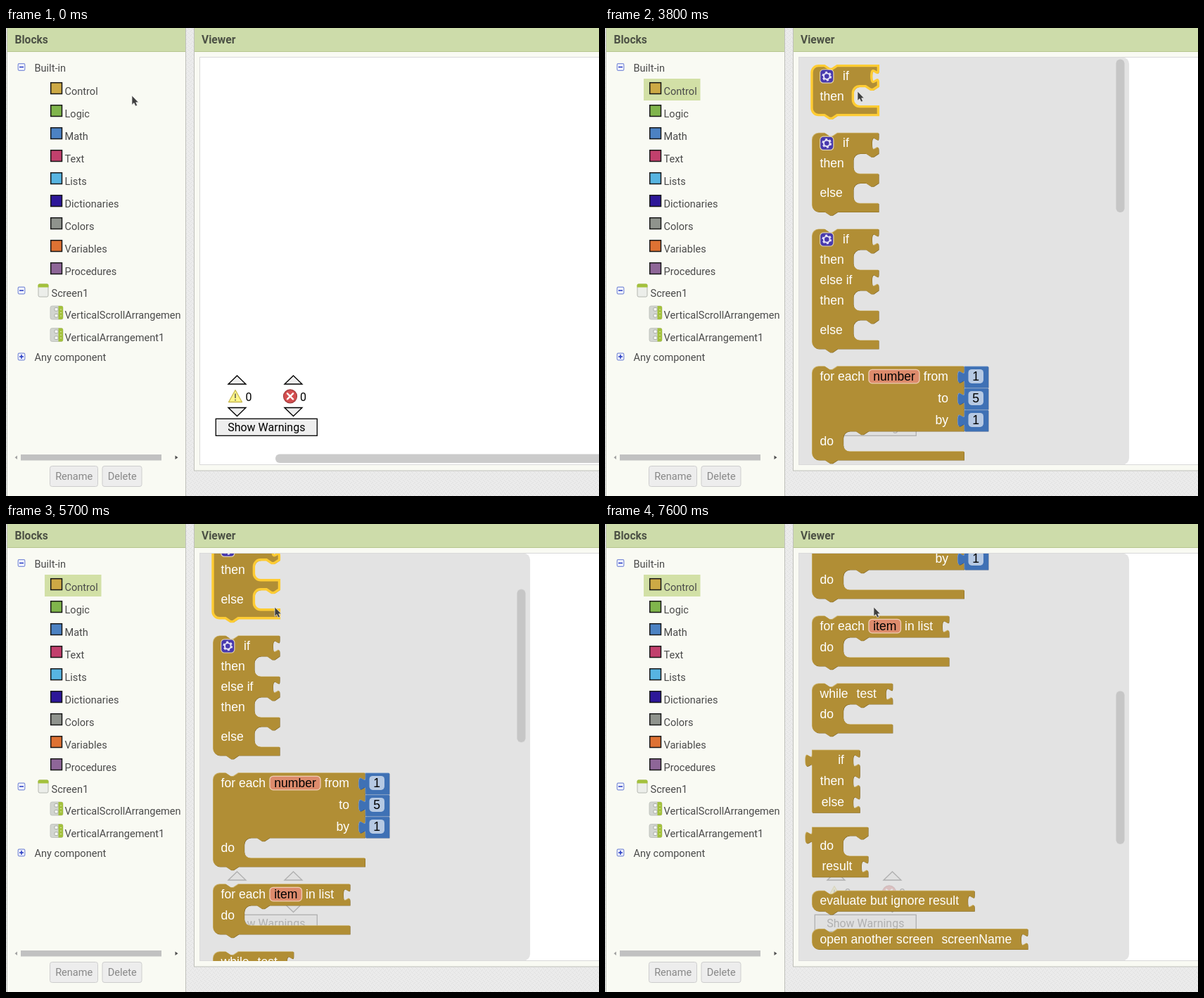
Animation, 843 px wide and 665 px high, one loop 8000 ms. Source, as an HTML page:

```html
<!DOCTYPE html>
<html lang="en">
<head>
<meta charset="utf-8">
<title>Blocks editor</title>
<style>
html, body { margin: 0; width: 100%; height: 100%; overflow: hidden; background: #e9e9e9; }
svg { display: block; }
.ui { font: 14.55px Roboto, sans-serif; fill: #4a4a4a; }
.head { font: bold 15.6px Roboto, sans-serif; fill: #4c5145; }
.warn { font: 16px Roboto, sans-serif; fill: #000; }
.block { font: 17.6px "Liberation Sans", Arial, sans-serif; fill: #fff; }
.block .dark { fill: #000; }
.sel { fill: none; stroke: #fc3; stroke-width: 3.4; }

/* every change is a hard cut */
.scroll, .thumb, .row, .flyout, .hbar, .cursor, .cursor > *, .sel, .lit {
  animation: 8s step-end infinite;
}
.sel, .lit { opacity: 0; }
.scroll { animation-name: scroll; }
.thumb { animation-name: thumb; }
.row { animation-name: row; }
.flyout { animation-name: flyout; }
.hbar { animation-name: hbar; }
.cursor { animation-name: move; }
.arrow { animation-name: arrow; }
.hand { animation-name: hand; }
.grab { animation-name: grab; }
.beam { animation-name: beam; }
.sel.s0 { animation-name: sel0; }
.sel.s1 { animation-name: sel1; }
.sel.s2 { animation-name: sel2; }
.lit { animation-name: beam; }

@keyframes scroll {
  0% { transform: translateY(0); }
  71.25% { transform: translateY(-127px); }
  77.5% { transform: translateY(-254px); }
  86.25% { transform: translateY(-381px); }
  95%, 100% { transform: translateY(-508px); }
}
@keyframes thumb {
  0% { transform: translateY(0); }
  71.25% { transform: translateY(48.2px); }
  77.5% { transform: translateY(96.4px); }
  86.25% { transform: translateY(144.6px); }
  95%, 100% { transform: translateY(192.8px); }
}
@keyframes row { 0% { opacity: 0; } 8.75%, 100% { opacity: 1; } }
@keyframes flyout { 0% { opacity: 0; } 47.5%, 100% { opacity: 1; } }
@keyframes hbar { 0% { opacity: 1; } 47.5%, 100% { opacity: 0; } }
@keyframes move {
  0% { transform: translate(179px, 96px); }
  1.25% { transform: translate(168px, 96px); }
  8.75% { transform: translate(125px, 91px); }
  10% { transform: translate(112px, 89.5px); }
  47.5% { transform: translate(359px, 90px); }
  52.5% { transform: translate(405px, 104px); }
  56.25% { transform: translate(417px, 108px); }
  57.5% { transform: translate(426px, 112px); }
  61.25% { transform: translate(389px, 106px); }
  63.75% { transform: translate(384.5px, 118px); }
  66.25% { transform: translate(383.8px, 117.8px); }
  71.25% { transform: translate(382px, 118px); }
  77.5% { transform: translate(383.8px, 117.8px); }
  86.25% { transform: translate(383px, 118px); }
  95%, 100% { transform: translate(382px, 118px); }
}
@keyframes arrow {
  0%, 47.5%, 71.25%, 95%, 100% { opacity: 1; }
  8.75%, 63.75%, 77.5% { opacity: 0; }
}
@keyframes hand { 0%, 47.5%, 100% { opacity: 0; } 8.75% { opacity: 1; } }
@keyframes grab { 0%, 71.25%, 86.25%, 100% { opacity: 0; } 63.75%, 77.5% { opacity: 1; } }
@keyframes beam { 0%, 95%, 100% { opacity: 0; } 86.25% { opacity: 1; } }
@keyframes sel0 { 0%, 56.25%, 71.25%, 100% { opacity: 0; } 47.5%, 63.75% { opacity: 1; } }
@keyframes sel1 { 0%, 77.5%, 100% { opacity: 0; } 71.25% { opacity: 1; } }
@keyframes sel2 { 0%, 86.25%, 100% { opacity: 0; } 77.5% { opacity: 1; } }
</style>
</head>
<body>
<svg width="843" height="665" viewBox="0 0 843 665">
  <defs>
    <pattern id="weave" width="6" height="6" patternUnits="userSpaceOnUse">
      <rect width="6" height="6" fill="#ebebeb"/>
      <path d="M0 0L3 3M3 6L6 3" stroke="#dfdfdf"/>
    </pattern>
    <clipPath id="view"><rect x="275" y="42" width="470" height="579"/></clipPath>
    <g id="toggle">
      <rect x="-4.8" y="-4.8" width="9.6" height="9.6" rx="1.5" fill="#f4f6ff" stroke="#7f8fd8" stroke-width="1.2"/>
      <path d="M-3 0H3" stroke="#2438c0" stroke-width="1.5"/>
    </g>
    <g id="vertical">
      <rect width="18" height="19" rx="2.5" fill="#d2d5d0" stroke="#b9bcb6" stroke-width=".8"/>
      <path d="M11.5 0H16a2 2 0 0 1 2 2V17a2 2 0 0 1-2 2H11.5Z" fill="#a3c13c"/>
      <g fill="#f6f7f4" stroke="#9da19a" stroke-width=".8">
        <rect x="6" y="2.5" width="5" height="4.5" rx="1"/>
        <rect x="6" y="11.5" width="5" height="4.5" rx="1"/>
      </g>
      <path d="M14 5h2M14 9.5h2M14 14h2" stroke="#dbe8ab"/>
    </g>
    <path id="up" d="M-12.5 12L0 0L12.5 12Z" fill="#eee" stroke="#000" stroke-width="1.3"/>
    <g id="gear">
      <g opacity=".6">
        <rect x="-9.6" y="-9.6" width="19.2" height="19.2" rx="4.8" fill="#00f" stroke="#fff" stroke-width="1.2"/>
      </g>
      <g fill="none" stroke="#e6e3f6">
        <circle r="4.3" stroke-width="2"/>
        <circle r="5.9" stroke-width="2" stroke-dasharray="3.09"/>
      </g>
    </g>
  </defs>

  <rect width="843" height="665" fill="url(#weave)"/>

  <!-- palette panel -->
  <rect x="1.5" y="-1" width="254" height="668" fill="#f9faf3" stroke="#bfc0ba"/>
  <rect x="2" width="253" height="33" fill="#cddcaa"/>
  <path d="M2 33.5H255" stroke="#b6c68f"/>
  <text class="head" x="12.5" y="21.5">Blocks</text>
  <rect class="row" x="55" y="72" width="80.5" height="31" fill="#d2e0a6"/>
  <g class="ui" id="tree">
    <text x="40.5" y="61.5">Built-in</text>
    <text x="64.5" y="382.4">Screen1</text>
    <text x="83.5" y="413.4">VerticalScrollArrangemen</text>
    <text x="83.5" y="445.4">VerticalArrangement1</text>
    <text x="40.5" y="473.4">Any component</text>
  </g>
  <use href="#toggle" x="22" y="55.5"/>
  <use href="#toggle" x="22" y="373"/>
  <use href="#toggle" x="22" y="467"/>
  <path d="M22 464V470" stroke="#2438c0" stroke-width="1.5"/>
  <rect x="46" y="364" width="14" height="18" rx="2" fill="#eceeea" stroke="#b4b7b0"/>
  <path d="M45.5 368.5V365.5a2 2 0 0 1 2-2H58.5a2 2 0 0 1 2 2V368.5Z" fill="#a3c13c"/>
  <use href="#vertical" x="63" y="395"/>
  <use href="#vertical" x="63" y="426.5"/>
  <rect x="21" y="606" width="200" height="8.5" fill="#c1c1c1"/>
  <path d="M16 607.5V613L12.5 610.2Z" fill="#a3a3a3"/>
  <path d="M240.5 607.5V613L244.5 610.2Z" fill="#505050"/>
  <g fill="#ededed" stroke="#cdcdcd">
    <rect x="62.5" y="622.5" width="68" height="29" rx="3"/>
    <rect x="137" y="622.5" width="56" height="29" rx="3"/>
  </g>
  <g class="ui" text-anchor="middle" style="fill:#888">
    <text x="96.7" y="642">Rename</text>
    <text x="165.2" y="642">Delete</text>
  </g>

  <!-- viewer panel -->
  <rect x="267.5" y="-1" width="580" height="630" fill="#f9faf3" stroke="#bfc0ba"/>
  <rect x="268" width="575" height="33" fill="#cddcaa"/>
  <path d="M268 33.5H843" stroke="#b6c68f"/>
  <text class="head" x="278" y="21.5">Viewer</text>
  <rect x="275.5" y="41.5" width="580" height="579" fill="#fff" stroke="#d9d9d9"/>
  <rect class="hbar" x="383" y="605.5" width="480" height="12.5" rx="6" fill="#cbcbcb"/>
  <use href="#up" x="328.5" y="494"/>
  <use href="#up" x="408.5" y="494"/>
  <use href="#up" transform="translate(328.5 551.5) scale(1 -1)"/>
  <use href="#up" transform="translate(408.5 551.5) scale(1 -1)"/>
  <path d="M326 514.5L335.5 531.5H316.5Z" fill="#fdf68c" stroke="#c9b94e" stroke-width="1.3" stroke-linejoin="round"/>
  <path d="M326 519.5V526M326 527.8V529.6" stroke="#6a6a5a" stroke-width="1.7"/>
  <circle cx="404" cy="523.3" r="9.5" fill="#d44f50" stroke="#a33c3e" stroke-width="1.2"/>
  <path d="M400 519.3l8 8m0-8l-8 8" stroke="#fff" stroke-width="2.4" stroke-linecap="round"/>
  <rect x="298.3" y="555.3" width="144" height="24" fill="#eee" stroke="#000" stroke-width="1.3"/>
  <g class="warn">
    <text x="340.5" y="529.8">0</text>
    <text x="418" y="529.8">0</text>
    <text x="370.3" y="573" text-anchor="middle">Show Warnings</text>
  </g>

  <g class="flyout">
    <path d="M275 41.5H735.5a9.6 9.6 0 0 1 9.6 9.6V611a9.6 9.6 0 0 1-9.6 9.6H275Z" fill="#ddd" fill-opacity=".8"/>
    <g clip-path="url(#view)"><g class="scroll block" id="blocks"></g></g>
    <rect class="thumb" x="726.5" y="44.5" width="12" height="217.5" rx="5.8" fill="#c6c6c6"/>
  </g>

  <g class="cursor">
    <path class="arrow" d="M0 0V13.2L3 10.5L5 15L7.6 14L5.7 9.7H9.4Z" fill="#3f3f3f" stroke="#eee" stroke-width=".7"/>
    <path class="hand" d="M-1.5 1.2q1.4-1.5 2.7 0L2 5.5l1.6-.7 1.4 1 1.7-.4 1 1 1.3.2q1 4-.9 9H1.2Q-1.5 12.5-4 9.3q.8-1.9 3.3-.2Z" fill="#444" stroke="#ddd" stroke-width=".7"/>
    <path class="grab" d="M-2.5 6.2Q-3.5 3.5-6.2.3q.3-2 2.6-.5L-5-4q.8-1.7 2.2-.2L-1.8-1.8-2-5.2q1.2-1.6 2.3 0L.8-2 1.6-5q1.4-1.2 2.2.3L3.4-1.5 4.8-3.5q1.8-.5 1.7 1.2Q5.9 3 4.6 6.2Z" fill="#fff" stroke="#111" stroke-width="1.1" stroke-linejoin="round"/>
    <g class="beam" fill="none">
      <path d="M-2.5-6.5Q0-6.5 0-4.5V4.5Q0 6.5-2.5 6.5M2.5-6.5Q0-6.5 0-4.5V4.5Q0 6.5 2.5 6.5M-1.5 2.5H1.5" stroke="#fff" stroke-width="2.2"/>
      <path d="M-2.5-6.5Q0-6.5 0-4.5V4.5Q0 6.5-2.5 6.5M2.5-6.5Q0-6.5 0-4.5V4.5Q0 6.5 2.5 6.5M-1.5 2.5H1.5" stroke="#444"/>
    </g>
  </g>
</svg>
<script>
const LEFT = 294;
const GOLD = ['#b18e35', '#cdb36a', '#836825'];
const BLUE = ['#3f71b5', '#7d9fd0', '#2c5189'];

const label = (x, y, s, anchor = 'start', cls = '') =>
  `<text x="${x}" y="${y}" text-anchor="${anchor}" class="${cls}">${s}</text>`;

const palette = [
  ['Control', '#cda945'], ['Logic', '#80b54c'], ['Math', '#4c82c3'],
  ['Text', '#c2406d'], ['Lists', '#57b4e1'], ['Dictionaries', '#2d1799'],
  ['Colors', '#8f938d'], ['Variables', '#de7233'], ['Procedures', '#8e6698']
];
document.getElementById('tree').innerHTML += palette.map(([name, color], i) =>
  `<rect x="63.7" y="${77.7 + 32 * i}" width="15.8" height="15.8" fill="${color}" stroke="#161616" stroke-width="1.5"/>` +
  label(83.5, 95 + 32 * i, name)).join('');

// Row kinds: v = value socket, s = statement mouth, b = plain bar.
function outline({ x = LEFT, y, right, rows, edge, out, next = true }) {
  const notch = 'l-7.2 4.8h-3.6l-7.2-4.8';
  const draw = {
    v: h => `v6c0 12-9.6-9.6-9.6 9s9.6-3 9.6 9v${h - 24}`,
    s: h => `H${edge + 36}${notch}h-8.4a9.6 9.6 0 0 0-9.6 9.6v${h - 19.2}a9.6 9.6 0 0 0 9.6 9.6H${right}`,
    b: h => `v${h}`
  };
  const start = out ? `M${x} ${y}`
    : `M${x} ${y + 9.6}a9.6 9.6 0 0 1 9.6-9.6h8.4l7.2 4.8h3.6l7.2-4.8`;
  const end = out ? `H${x}V${y + 24}c0-12-9.6 9.6-9.6-9s9.6 3 9.6-9z`
    : `${next ? `H${x + 36}${notch}` : ''}H${x + 9.6}a9.6 9.6 0 0 1-9.6-9.6z`;
  return start + `H${right}` + rows.map(([kind, h]) => draw[kind](h)).join('') + end;
}

const bevel = (d, [main, light, dark]) =>
  `<path d="${d}" fill="${dark}" transform="translate(1.2 1.2)"/><path d="${d}" fill="${light}"/>` +
  `<path d="${d}" fill="${main}" transform="translate(.7 .7)"/>`;

// Parts that can sit in a row; each takes the y of the row's top.
const text = (x, s, anchor) => y => label(x, y + 20.6, s, anchor);
const gear = y => `<use href="#gear" x="315.3" y="${y + 15}"/>`;
const variable = (x, w, s, cls) => y => {
  const box = `x="${x}" y="${y + 5}" width="${w}" height="19.5" rx="4.8"`;
  return `<rect ${box} fill="#dd8b6c" stroke="#f0cdb4" stroke-width="1.3"/>` +
    (cls ? `<rect class="${cls}" ${box} fill="#e9ae98" stroke="#e9b8a2" stroke-width="1.3"/>` : '') +
    label(x + w / 2, y + 20.6, s, 'middle', 'dark');
};
const number = n => y =>
  bevel(outline({ x: 510.6, y: y + .2, right: 544.2, rows: [['b', 29.8]], out: true }), BLUE) +
  `<rect x="516.5" y="${y + 4.6}" width="21.5" height="20" rx="4.8" fill="#fff" fill-opacity=".62"/>` +
  label(527.2, y + 20.6, n, 'middle', 'dark');

const then = ['s', 29, text(305.5, 'then')];
const orElse = ['s', 29, text(305.5, 'else')];
const loopDo = ['s', 29, text(305.5, 'do')];
const gearIf = ['v', 29, gear, text(338, 'if')];
const gap = ['b', 13];
const foot = ['b', 12];
const branch = { right: 388.4, edge: 352.4 };

const blocks = [
  { y: 53.6, ...branch, rows: [gearIf, then, foot] },
  { y: 148.8, ...branch, rows: [gearIf, then, gap, orElse, foot] },
  { y: 285.4, ...branch, rows: [gearIf, then, ['v', 29, text(305.5, 'else if')], then, gap, orElse, foot] },
  { y: 480.3, right: 509.8, edge: 338, rows: [
    ['v', 31, text(305.5, 'for each'), variable(375, 72, 'number', 'lit'), text(488, 'from', 'end'), number(1)],
    ['v', 31, text(488, 'to', 'end'), number(5)],
    ['v', 30, text(488, 'by', 'end'), number(1)],
    loopDo, foot] },
  { y: 638.3, right: 488.4, edge: 338, rows: [
    ['v', 30, text(305.5, 'for each'), variable(375, 45.5, 'item'), text(426, 'in list')], loopDo, foot] },
  { y: 734.2, right: 408.2, edge: 338, rows: [
    ['v', 29, text(305.5, 'while'), text(357.5, 'test')], loopDo, foot] },
  { y: 828.8, right: 361.6, out: true, rows: [
    ['v', 29.8, text(340, 'if', 'end')], ['v', 29.8, text(340, 'then', 'end')], ['v', 29.2, text(340, 'else', 'end')]] },
  { y: 938.4, right: 373.4, edge: 337.6, out: true, rows: [
    foot, loopDo, ['v', 29.6, text(351.5, 'result', 'end')]] },
  { y: 1028.8, right: 524.6, rows: [['v', 28.8, text(305.5, 'evaluate but ignore result')]] },
  { y: 1083, right: 600.4, next: false, rows: [
    ['v', 28.8, text(305.5, 'open another screen'), text(478.5, 'screenName')]] }
];

document.getElementById('blocks').innerHTML = blocks.map((block, i) => {
  const d = outline(block);
  let y = block.y;
  const parts = block.rows.map(([, h, ...items]) => {
    const row = items.map(item => item(y)).join('');
    y += h;
    return row;
  }).join('');
  const glow = i < 3 ? `<path class="sel s${i}" d="${d}"/>` : '';
  return bevel(d, GOLD) + glow + parts;
}).join('');
</script>
</body>
</html>
```
